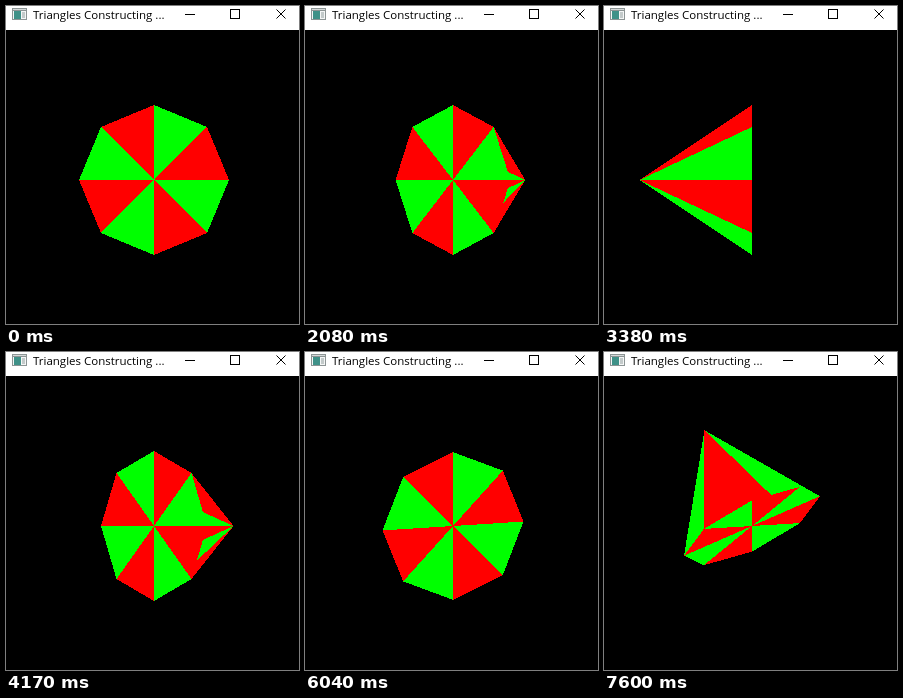
These frames come from a looping animation (293 px wide and 318 px high, 8000 ms). An HTML page:

```html
<!DOCTYPE html>
<html lang="en">
<head>
<meta charset="utf-8">
<title>Triangles</title>
<style>
  html, body { margin: 0; width: 100%; height: 100%; overflow: hidden; background: #000; }
  svg { display: block; }
  text { font: 11.5px "Open Sans", "Noto Sans", sans-serif; }
</style>
</head>
<body>
<svg width="293" height="318" viewBox="0 0 293 318" shape-rendering="crispEdges">
  <rect width="293" height="318" fill="#000"/>
  <rect width="293" height="24" fill="#fff"/>
  <g id="icon">
    <rect x="6" y="2" width="15" height="12" fill="#8c9494"/>
    <rect x="7" y="3" width="13" height="1" fill="#d5dada"/>
    <rect x="7" y="5" width="13" height="8" fill="#f4f6f6"/>
    <rect x="8" y="5" width="7" height="8" fill="#3f9188"/>
    <rect x="16" y="6" width="3" height="6" fill="#c3caca"/>
  </g>
  <text x="27" y="13">Triangles Constructing ...</text>
  <g fill="none" stroke="#000">
    <path d="M179 8.5h10M224.5 3.5h9v9h-9z"/>
    <path d="M270.5 3.5l9 9M279.5 3.5l-9 9" shape-rendering="auto"/>
  </g>
  <g id="solid"></g>
</svg>
<script>
const LOOP = 8000, STEP = 5 * Math.PI / 180;
const CX = 148, CY = 174, RADIUS = 75, HEIGHT = 112.5, SIDES = 8;
const RED = '#f00', GREEN = '#0f0';

// [time, steps turned]: each key press turns the solid by one step
const yaw = [[0, 0], [370, 1], [860, 2], [1210, 14], [2080, 44], [2480, 58],
  [3290, 87], [3380, 90], [4890, 142], [4940, 143], [5110, 148], [7600, 149]];
const pitch = [[0, 0], [5420, 1], [6040, 2], [6560, 3], [6780, 10], [7110, 22]];

function angleAt(keys, t) {
  const next = keys.findIndex(k => k[0] > t);
  if (next < 0) return keys[keys.length - 1][1] * STEP;
  const [t0, n0] = keys[next - 1], [t1, n1] = keys[next];
  return Math.floor(n0 + (n1 - n0) * (t - t0) / (t1 - t0) + 1e-6) * STEP;
}

// Rim runs counterclockwise from the top
const rim = Array.from({ length: SIDES + 1 }, (_, i) => {
  const a = Math.PI / 2 + i * 2 * Math.PI / SIDES;
  return [RADIUS * Math.cos(a), RADIUS * Math.sin(a), 0];
});

// Painted in list order without a depth test: cone sides, then the base
const faces = [];
function addFan(tip, colors) {
  for (let i = 0; i < SIDES; i++) {
    const el = document.createElementNS('http://www.w3.org/2000/svg', 'polygon');
    el.setAttribute('fill', colors[i % 2]);
    document.getElementById('solid').append(el);
    faces.push({ el, points: [tip, rim[i], rim[i + 1]] });
  }
}
addFan([0, 0, HEIGHT], [GREEN, RED]);
addFan([0, 0, 0], [RED, GREEN]);

function draw(t) {
  const a = angleAt(yaw, t), b = angleAt(pitch, t);
  const project = ([x, y, z]) => {
    const sx = x * Math.cos(a) - z * Math.sin(a);
    const depth = x * Math.sin(a) + z * Math.cos(a);
    const sy = y * Math.cos(b) + depth * Math.sin(b);
    return (CX + sx).toFixed(2) + ',' + (CY - sy).toFixed(2);
  };
  for (const { el, points } of faces) {
    el.setAttribute('points', points.map(project).join(' '));
  }
}

const start = performance.now();
function tick() {
  draw((performance.now() - start) % LOOP);
  requestAnimationFrame(tick);
}
draw(0);
requestAnimationFrame(tick);
</script>
</body>
</html>
```
